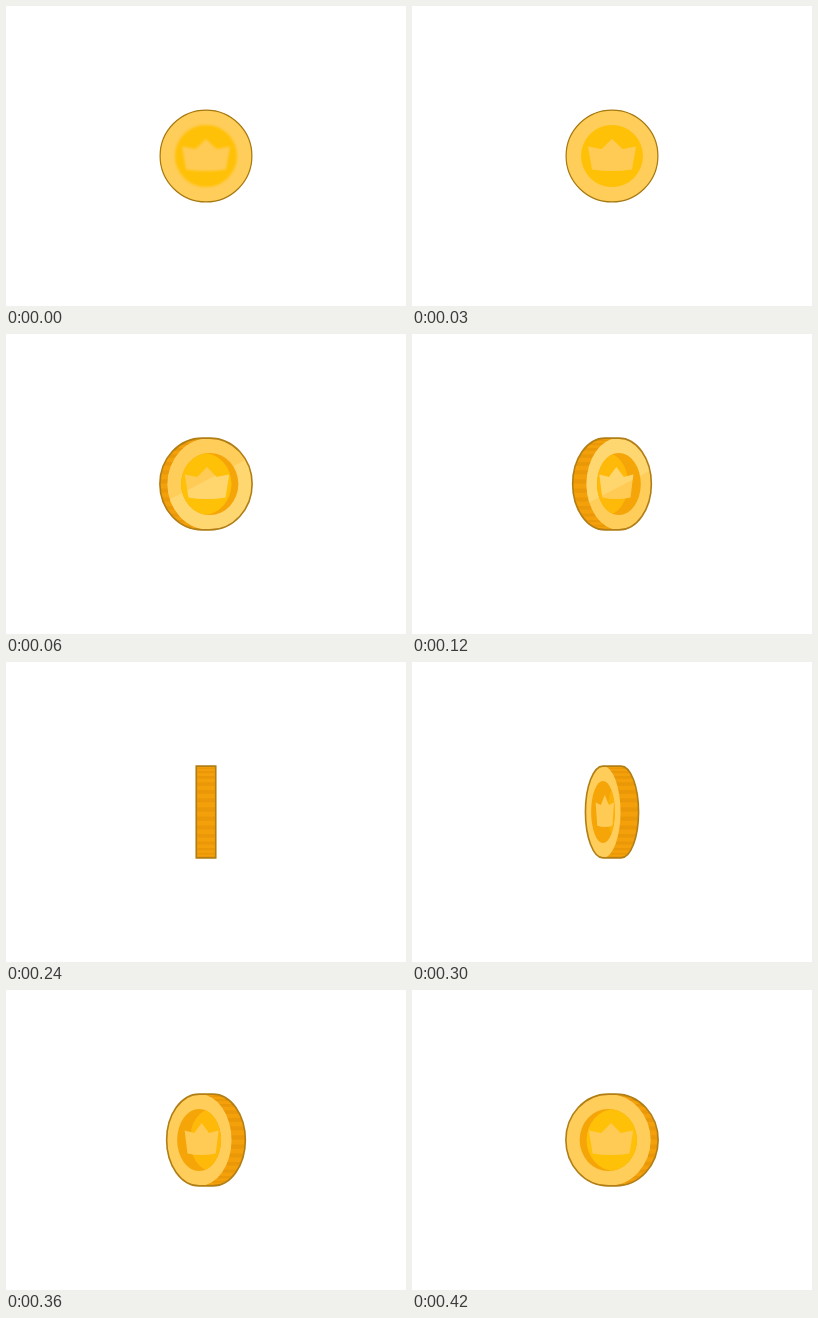
Recreate the animation shown at these times as an HTML page with a canvas. Size 400 px wide and 300 px high, loop 480 ms.

```html
<!DOCTYPE html>
<html lang="en">
<head>
<meta charset="utf-8">
<title>Spinning coin</title>
<style>
  html, body { margin: 0; width: 100%; height: 100%; overflow: hidden; background: #fff; }
  canvas { display: block; width: 400px; height: 300px; }
</style>
</head>
<body>
<canvas id="stage" width="400" height="300"></canvas>
<script>
const ctx = document.getElementById('stage').getContext('2d');
const LOOP = 480, STEP = 60, FLASH = 30;
const RADIUS = 45.9, GROOVE = 31, THICKNESS = 19.5, DEPTH = 18;
const FLOORS = ['#ffc107', '#ffc107', '#ffb908', '#fbb108'];

const disc = (x, rx, ry) => {
  const path = new Path2D();
  path.ellipse(x, 0, rx, ry, 0, 0, Math.PI * 2);
  return path;
};

// Silhouette of the tilted cylinder: left half of the back, right half of the front.
function silhouette(shift, rx) {
  const path = new Path2D();
  path.ellipse(-shift, 0, rx, RADIUS, 0, Math.PI / 2, Math.PI * 1.5);
  path.ellipse(shift, 0, rx, RADIUS, 0, -Math.PI / 2, Math.PI / 2);
  path.closePath();
  return path;
}

function crown(x, squash) {
  const path = new Path2D();
  const points = [[-24, -9.5], [-10.5, -7], [0, -17], [10.5, -7], [24, -9.5], [20, 13.5]];
  points.forEach(([px, py]) => path.lineTo(x + px * squash, py));
  path.quadraticCurveTo(x, 16.5, x - 20 * squash, 13.5);
  path.closePath();
  return path;
}

function clipped(path, paint) {
  ctx.save();
  ctx.clip(path);
  paint();
  ctx.restore();
}

function fill(path, color) {
  ctx.fillStyle = color;
  ctx.fill(path);
}

function drawRidges() {
  ctx.fillStyle = '#ea9708';
  for (let a = -1.5; a < 1.5; a += 0.2) {
    const top = RADIUS * Math.sin(a), bottom = RADIUS * Math.sin(a + 0.09);
    ctx.fillRect(-50, top, 100, bottom - top);
  }
}

// A slanted band of light that climbs the face as the coin turns.
function drawShine(step) {
  const middle = 81 - 53 * step;
  ctx.strokeStyle = 'rgba(255, 228, 145, 0.42)';
  ctx.lineWidth = 56;
  ctx.beginPath();
  ctx.moveTo(-100, middle + 52);
  ctx.lineTo(100, middle - 52);
  ctx.stroke();
}

function drawFace(x, squash, tilt, step, soft) {
  const front = disc(x, RADIUS * squash, RADIUS);
  const groove = disc(x, GROOVE * squash, GROOVE);
  const emblem = crown(x - 3 * Math.min(1, tilt * 2.5) * Math.sqrt(squash), squash);
  const floor = FLOORS[Math.min(step, 8 - step)];
  const shiny = tilt && step < 4;

  fill(front, '#ffcd59');
  if (shiny) clipped(front, () => drawShine(step));
  if (soft) ctx.filter = 'blur(1.2px)';
  fill(groove, tilt ? '#f5a508' : floor);
  if (tilt) clipped(groove, () => fill(disc(x - DEPTH * tilt, GROOVE * squash, GROOVE), floor));
  fill(emblem, '#ffcb55');
  ctx.filter = 'none';
  if (shiny) clipped(emblem, () => drawShine(step));
}

function drawCoin(step, soft) {
  const angle = step * Math.PI / 8;
  const squash = Math.abs(Math.cos(angle));
  const tilt = Math.sin(angle);
  const shift = THICKNESS * tilt / 2;
  const body = silhouette(shift, RADIUS * squash);

  ctx.clearRect(0, 0, 400, 300);
  ctx.save();
  ctx.translate(200, 150);
  if (step > 4) ctx.scale(-1, 1);
  fill(body, '#f3a00a');
  clipped(body, drawRidges);
  if (step !== 4) drawFace(shift, squash, tilt, step, soft);
  ctx.strokeStyle = step ? '#b17e16' : '#a67a12';
  ctx.lineWidth = step ? 1.6 : 1.2;
  ctx.stroke(body);
  ctx.restore();
}

function tick(now) {
  const time = now % LOOP;
  drawCoin(Math.floor(time / STEP), time < FLASH);
  requestAnimationFrame(tick);
}
tick(0);
</script>
</body>
</html>
```
